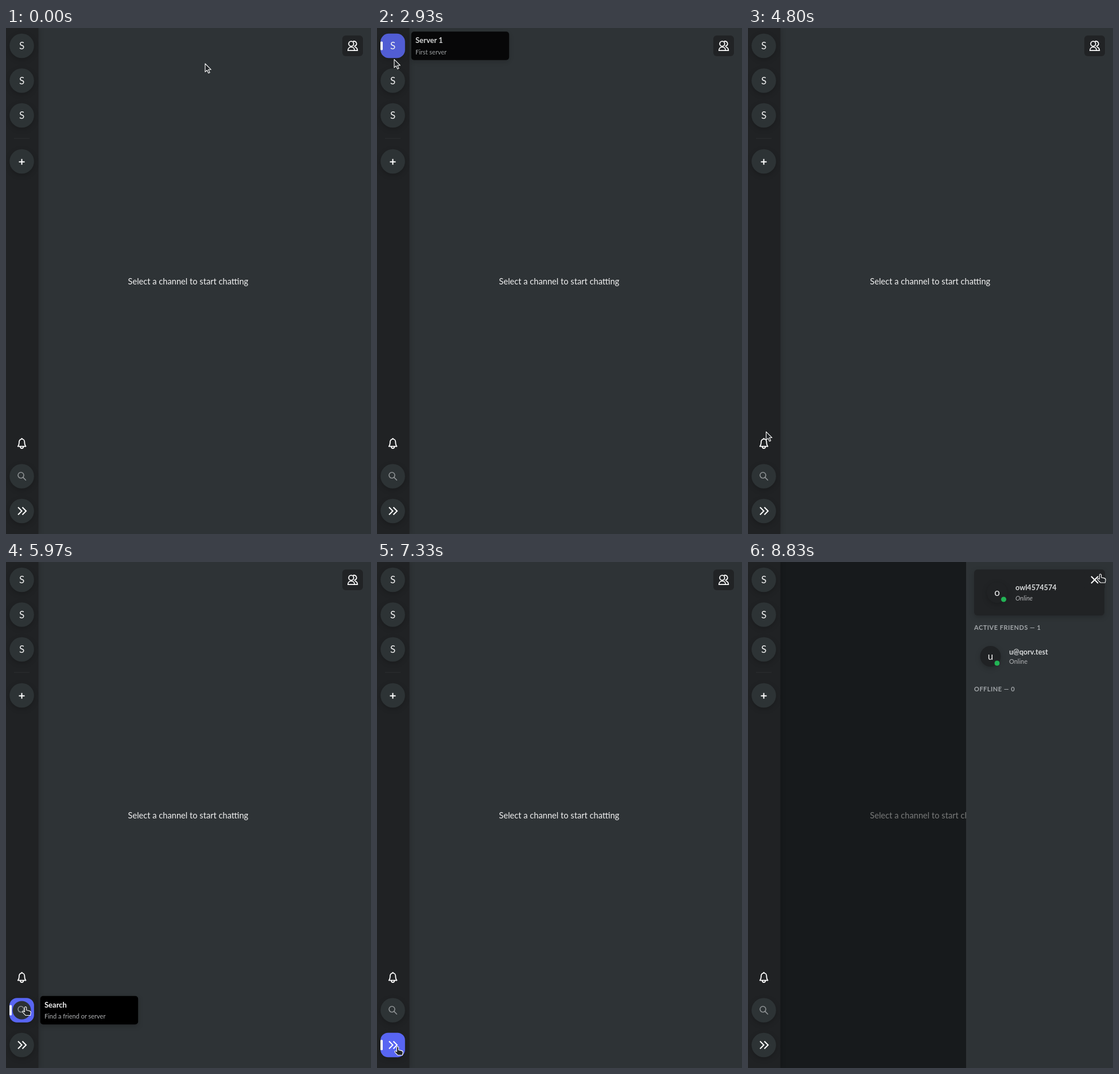
Recreate the animation shown at these times as an HTML page. Size 636 by 880 pixels, loop 9230 ms.

```html
<!DOCTYPE html>
<html lang="en">
<head>
<meta charset="utf-8">
<title>Chat sidebar</title>
<style>
  html, body { margin: 0; width: 100%; height: 100%; overflow: hidden; background: #2e3336; }
  svg { display: block; width: 636px; height: 880px; font-family: Lato, "Noto Sans", sans-serif; fill: #f2f2f2; }
  .line { fill: none; stroke: #fff; stroke-width: 2; }
  .shadow { filter: drop-shadow(0 3px 4px rgba(0, 0, 0, .2)); }
  .edge { filter: drop-shadow(2px 0 4px rgba(0, 0, 0, .15)); }
  .initial { font-size: 17px; text-anchor: middle; }
  .title { font-size: 13px; font-weight: bold; }
  .note { font-size: 11px; fill: #b0b2b4; }
  .heading { font-size: 11px; font-weight: bold; letter-spacing: .5px; fill: #a2a6a9; }
  .name { font-size: 12.6px; font-weight: bold; fill: #d8dadb; }
  .cursor { fill: #232629; stroke: #fff; stroke-width: 1.1; stroke-linejoin: round; }
</style>
</head>
<body>
<svg id="stage" viewBox="0 0 636 880">
  <rect width="636" height="880" fill="#2e3336"/>
  <text x="212.5" y="446" font-size="14.65">Select a channel to start chatting</text>
  <rect id="dim" x="56" width="580" height="880" fill="#000303"/>

  <g id="panel">
    <rect x="380" width="256" height="880" fill="#2e3336"/>
    <rect class="shadow" x="394" y="13" width="227" height="80" rx="6" fill="#212325"/>
    <g id="friends"></g>
    <text class="name" x="466" y="49">owl4574574</text>
    <text class="note" x="466" y="67" font-style="italic">Online</text>
    <text class="heading" x="394" y="118">ACTIVE FRIENDS — 1</text>
    <text class="name" x="455" y="161">u@qorv.test</text>
    <text class="note" x="455" y="177">Online</text>
    <text class="heading" x="394" y="225">OFFLINE — 0</text>
  </g>

  <rect x="586" y="13" width="36" height="36" rx="6" fill="#212325"/>
  <g id="people" class="line" style="stroke-width:1.8;stroke-linejoin:round">
    <circle cx="601.5" cy="27.4" r="4.3"/>
    <path d="M604.5 23.5a4.3 4.3 0 1 1 1.8 8.1M595.8 39.2c0-3.6 2.5-6 5.8-6s5.8 2.4 5.8 6zM608 33.2c2.6.7 4.4 2.8 4.4 6h-5"/>
  </g>
  <path id="close" class="line" d="M598 25l12 12M610 25l-12 12"/>

  <rect class="edge" width="56.5" height="880" fill="#202224"/>
  <rect x="14" y="191.5" width="27" height="1" fill="#2c2f31"/>
  <g id="buttons"></g>
  <path class="line" style="stroke-width:1.8;stroke-linejoin:round" d="M20.7 727.6c1.8-2 2.2-3.6 2.2-7.8a4.7 5 0 0 1 9.4 0c0 4.2.4 5.8 2.2 7.8zM27.6 713v2M25 728.2a2.6 2.8 0 0 0 5.2 0"/>
  <rect id="popover" class="shadow" x="57" y="709" width="276" height="162" rx="6" fill="#212325"/>
  <g id="tips"></g>

  <path id="arrow" class="cursor" d="M0 0v14.3l3.3-3 2.5 5.2 2.3-1-2.4-5.2h4.6z"/>
  <path id="hand" class="cursor" d="M-1.6 2.2Q0-.2 1.6 2.2v4.8l4.6.9q3 .7 3 3l-.8 5.1h-8.2l-5-5.2q-.9-2.2 1.2-2.2l2 1.3z"/>
</svg>
<script>
const LOOP = 9230, FADE = 200;
const $ = id => document.getElementById(id);
const clamp = v => Math.max(0, Math.min(1, v));
const show = (id, on) => $(id).style.display = on ? "" : "none";

const initial = (x, y, letter) => `<text class="initial" x="${x}" y="${y + 6}">${letter}</text>`;
const serverIcon = y => initial(27.5, y, "S");
const plusIcon = () => `<path class="line" d="M22.5 232.8h10M27.5 227.8v10"/>`;
const searchIcon = () => `<circle class="inner" cx="27.5" cy="779.5" r="16" fill="#2b3034"/>
  <g class="line" style="stroke:#8f9395;stroke-width:1.6"><circle cx="26" cy="777.8" r="5"/><path d="M29.6 781.4l5.2 5.4"/></g>`;
const chevronIcon = () => `<path class="line" d="M21 833.5l6.5 6.5-6.5 6.5M28.5 833.5l6.5 6.5-6.5 6.5"/>`;

// enter and leave are the hover times in ms
const buttons = [
  { y: 31, icon: serverIcon, enter: 2052, leave: 2900, title: "Server 1", note: "First server" },
  { y: 91.5, icon: serverIcon, enter: 3000, leave: 3230, title: "Server 2", note: "Second server" },
  { y: 152, icon: serverIcon, enter: 3320, leave: 3720, title: "Server 3", note: "Third server" },
  { y: 232, icon: plusIcon, enter: 3810, leave: 3930 },
  { y: 779.5, icon: searchIcon, enter: 5750, leave: 6595, title: "Search", note: "Find a friend or server" },
  { y: 840, icon: chevronIcon, enter: 6785, leave: 7820 }
];

$("buttons").innerHTML = buttons.map(({ y, icon }) => `<g>
  <rect class="shape shadow" x="6.2" y="${y - 21.3}" width="42.6" height="42.6" fill="#2d3335"/>
  <rect class="shape blue" x="6.2" y="${y - 21.3}" width="42.6" height="42.6" fill="#5865f2"/>
  ${icon(y)}<rect class="pill" x="6" width="4" rx="1.5" fill="#fff"/></g>`).join("");

$("tips").innerHTML = buttons.map(({ y, title, note }) => title ? `<g>
  <rect class="shadow" x="59.7" y="${y - 24.7}" width="170.5" height="49.5" rx="5" fill="#000"/>
  <text class="title" x="67" y="${y - 5}">${title}</text>
  <text class="note" x="67" y="${y + 14.5}">${note}</text></g>` : "<g></g>").join("");

$("friends").innerHTML = [[434, 53, "o"], [422.5, 164, "u"]].map(([x, y, letter]) =>
  `<circle class="shadow" cx="${x}" cy="${y}" r="18" fill="#202224"/>${initial(x, y, letter)}
  <circle cx="${x + 11.5}" cy="${y + 12}" r="5" fill="#22b455" stroke="#212325"/>`).join("");

buttons.forEach((button, i) => {
  const group = $("buttons").children[i];
  button.shapes = group.querySelectorAll(".shape");
  button.blue = group.querySelector(".blue");
  button.pill = group.querySelector(".pill");
  button.inner = group.querySelector(".inner");
  button.tip = $("tips").children[i];
});

// Cursor tip: time, x, y
const route = [
  [70, 347, 62], [530, 13, 34], [700, 13, 34], [900, 31, 29], [2670, 31, 29], [3570, 26, 155],
  [3600, 26, 155], [4500, 11, 582], [4530, 11, 582], [4900, 36, 728], [5630, 36, 728],
  [5900, 34, 772], [6530, 36, 788], [6600, 37, 802], [6770, 38, 818], [7370, 36, 842],
  [7770, 36, 842], [8130, 592, 140], [8530, 614, 20], [LOOP, 614, 20]
];
const handTimes = [[2045, 2900], [3000, 3230], [3320, 3720], [3810, 3930], [4830, 7820], [8400, LOOP]];

function cursorAt(t) {
  const i = route.findIndex(p => p[0] > t);
  if (i < 1) return route[0].slice(1);
  const [t0, x0, y0] = route[i - 1], [t1, x1, y1] = route[i];
  const u = (t - t0) / (t1 - t0), k = u * u * (3 - 2 * u);
  return [x0 + (x1 - x0) * k, y0 + (y1 - y0) * k];
}

function draw() {
  const t = performance.now() % LOOP;

  for (const b of buttons) {
    const hover = Math.min(clamp((t - b.enter) / FADE), clamp(1 - (t - b.leave) / FADE));
    b.shapes.forEach(s => s.setAttribute("rx", 21.3 - 8.3 * hover));
    b.blue.setAttribute("opacity", hover);
    b.pill.setAttribute("y", b.y - 9 * hover);
    b.pill.setAttribute("height", 18 * hover);
    b.tip.setAttribute("opacity", hover);
    if (b.inner) b.inner.setAttribute("opacity", hover);
  }

  const open = 1 - (1 - clamp((t - 8560) / 270)) ** 3;
  $("panel").setAttribute("transform", `translate(${256 * (1 - open)})`);
  $("dim").setAttribute("opacity", .5 * open);
  show("panel", open > 0);
  show("close", open > 0);
  show("people", open === 0);
  show("popover", t >= 5100 && t < 5630);

  const isHand = handTimes.some(([from, to]) => t >= from && t < to);
  const cursor = isHand ? "hand" : "arrow";
  show("hand", isHand);
  show("arrow", !isHand);
  $(cursor).setAttribute("transform", `translate(${cursorAt(t)})`);

  requestAnimationFrame(draw);
}
draw();
</script>
</body>
</html>
```
